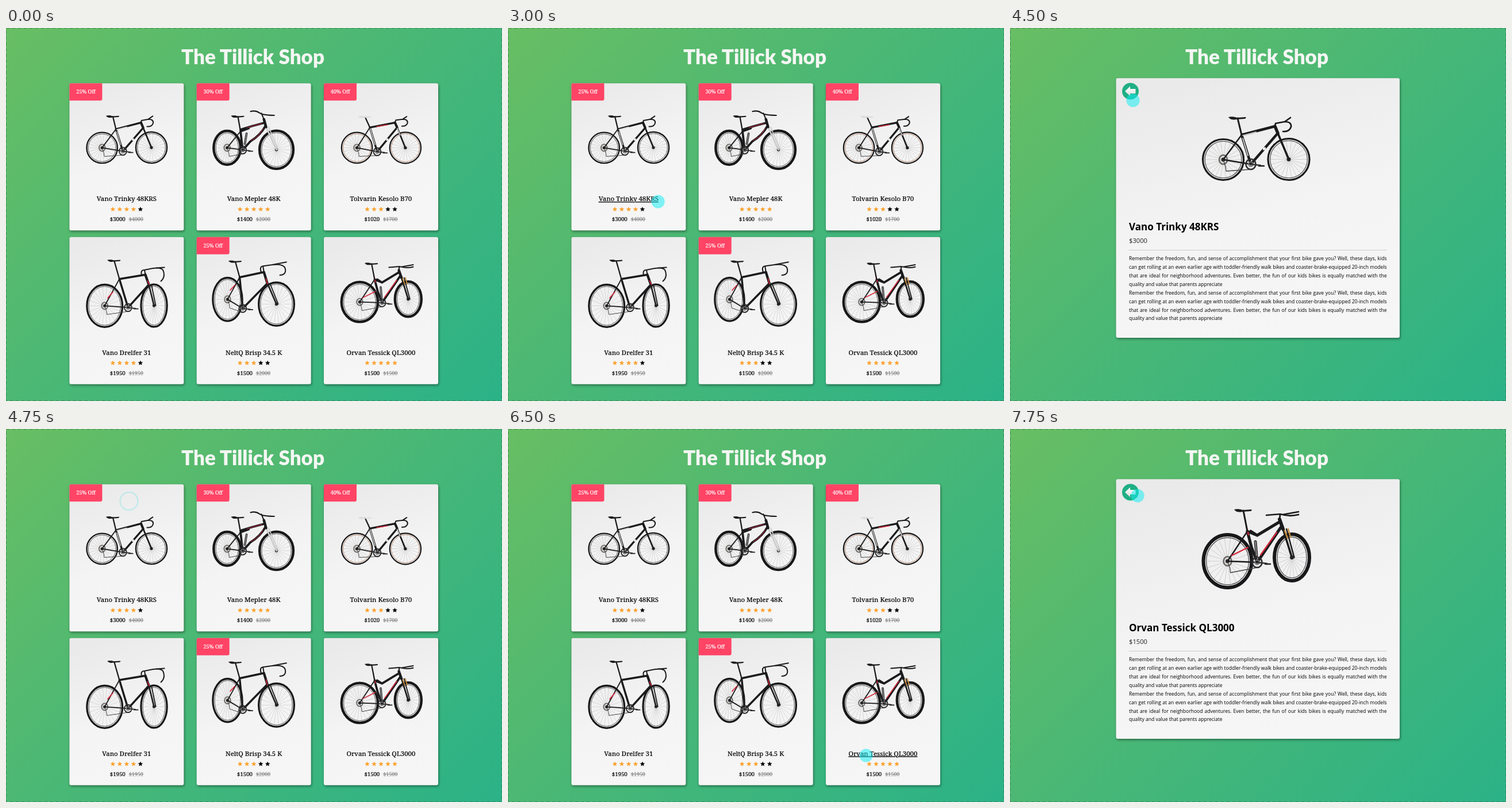
Write an HTML page that moves like this. It is 863 px wide and 649 px high and loops after 8 s.

```html
<!DOCTYPE html>
<html lang="en">
<head>
<meta charset="utf-8">
<title>Bike shop</title>
<style>
  html, body { margin: 0; width: 100%; height: 100%; overflow: hidden; }
  body { background: linear-gradient(135deg, #68be63, #4cb874 43%, #2bb287); }
  svg { display: block; width: 863px; height: 649px; }
  path { fill: none; stroke-linecap: round; stroke-linejoin: round; }
  text { text-anchor: middle; }
  .shop { font: 900 35px Lato, sans-serif; fill: #f4f6f3; }
  .name, .price, .off { font-family: "Noto Serif", serif; font-weight: 500; }
  .name { font-size: 11.4px; stroke: #000; stroke-width: .2; }
  .price { font-size: 9.6px; stroke: #000; stroke-width: .2; }
  .old { font-size: 9px; fill: #777; stroke: none; text-decoration: line-through; }
  .off { font-size: 9px; fill: #fff; stroke: #fff; stroke-width: .2; }
  .card { filter: drop-shadow(1px 2px 2px rgba(0, 0, 0, .42)); }
  .title, .cost { font-family: "Open Sans", sans-serif; text-anchor: start; }
  .title { font-size: 17.05px; font-weight: 700; }
  .cost { font-size: 11.2px; fill: #222; }
  p { margin: 0; font: 8.53px/14.87px "Open Sans", sans-serif; text-align: justify; color: #000; }
</style>
</head>
<body>
<svg id="stage" viewBox="0 0 863 649"></svg>
<script>
const LOOP = 8000;
const blurb = 'Remember the freedom, fun, and sense of accomplishment that your first bike gave you? ' +
  'Well, these days, kids can get rolling at an even earlier age with toddler-friendly walk bikes and ' +
  'coaster-brake-equipped 20-inch models that are ideal for neighborhood adventures. Even better, the fun ' +
  'of our kids bikes is equally matched with the quality and value that parents appreciate';

// Geometry is given at the size of the detail page.
const bikes = [
  { name: 'Vano Trinky 48KRS', price: 3000, old: 4000, stars: 4, off: 25,
    rear: [371, 229, 35.5, 35.5], front: [485, 228.5, 36, 36], tyre: 3.2,
    bb: [419, 237], seat: [396, 157], top: [403, 186], head: [461, 171], crown: [466, 183],
    tube: 4.4, bar: 'M461 171L462 166 478 163q12 0 11 9q-3 9-14 8M478 163L488 156',
    trim: 'M405 187L428 181M405 192L414 222', trimColor: '#ddd', mark: '#eee' },
  { name: 'Vano Mepler 48K', price: 1400, old: 2000, stars: 5, off: 30,
    rear: [366, 229, 31, 39], front: [480, 233.5, 39, 44], tyre: 6,
    bb: [402, 234], seat: [391, 157], top: [397, 191], head: [451, 163], crown: [456, 181],
    tube: 5, bar: 'M420 145Q432 142 440 148T475 154M445 149L451 163', fork: '#ccc',
    frame: 'M397 187Q425 178 453 171M455 178Q443 200 420 214L402 234 397 191L416 184',
    trim: 'M412 183Q432 176 446 173M449 185Q440 203 422 212', trimColor: '#8e2638', shock: 'M411 196L407 220' },
  { name: 'Tolvarin Kesolo B70', price: 1020, old: 1700, stars: 3, off: 40,
    rear: [372, 229, 35.5, 35.5], front: [484, 229, 36, 36], tyre: 3, rim: '#b98a72',
    bb: [419, 238], seat: [391, 158], top: [402, 182], head: [460, 171], crown: [465, 182],
    tube: 4.4, bar: 'M460 171L462 165 478 163q12 0 11 9q-3 8-13 7M478 163L487 157', saddle: '#ddd',
    trim: 'M403 185L414 222M465 184L472 200', trimColor: '#eee', red: 'M418 180L442 176', mark: '#eee' },
  { name: 'Vano Drelfer 31', price: 1950, old: 1950, stars: 4,
    rear: [377, 239, 41, 49], front: [491, 238.5, 30, 49], tyre: 4.4,
    bb: [431, 243], seat: [399, 135], top: [411, 177], head: [471, 167], crown: [479, 190],
    tube: 4.6, bar: 'M471 167L469 156Q460 156 462 166M469 156L490 152Q508 150 512 157Q518 172 507 182M490 152L515 150',
    red: 'M476 181L480 190M384 221L396 207', fork: '#222' },
  { name: 'NeltQ Brisp 34.5 K', price: 1500, old: 2000, stars: 3, off: 25,
    rear: [367, 224, 34, 50], front: [480, 235, 41, 50], tyre: 4.4,
    bb: [402, 245], seat: [385, 137], top: [395, 173], head: [451, 161], crown: [459, 187],
    tube: 4.6, bar: 'M451 161L449 147Q440 148 445 162M449 147L470 144Q496 141 500 152Q504 167 488 168M470 144L503 138',
    red: 'M456 176L459 188M373 203L384 191', fork: '#222' },
  { name: 'Orvan Tessick QL3000', price: 1500, old: 1500, stars: 5,
    rear: [378.5, 230, 42, 46], front: [490.5, 223.5, 30.5, 40.5], tyre: 6,
    bb: [430, 232], seat: [406, 142], top: [413, 178], head: [469, 157], crown: [475, 174],
    tube: 5, bar: 'M446 150L470 148Q486 153 502 149M474 149L502 144M469 157L470 149', fork: '#1e1e1e', gold: 'M476 172L483 190M484 174L488 188',
    frame: 'M413 178L430 185 470 161M413 178L420 205 430 232 472 170M430 185L419 178',
    red: 'M436 219L464 180M386 220L414 206M411 169L415 184', shock: 'M427 196L429 220' }
];

const stroke = (d, width, color = '#1b1b1d') => d ? `<path d="${d}" stroke="${color}" stroke-width="${width}"/>` : '';
const poly = (...pts) => 'M' + pts.map(([x, y]) => x + ' ' + y).join('L');
const ring = ([x, y, rx, ry], width, color) =>
  `<ellipse cx="${x}" cy="${y}" rx="${rx}" ry="${ry}" fill="none" stroke="${color}" stroke-width="${width}"/>`;

function wheel([x, y, rx, ry], tyre, rim = '#555') {
  let d = '';
  for (let i = 0; i < 22; i++) {
    const a = i * Math.PI / 11;
    d += poly([x, y], [x + Math.cos(a) * (rx - tyre), y + Math.sin(a) * (ry - tyre)]);
  }
  const inner = tyre * .5 + 2;
  return stroke(d, .5, '#aaa') + ring([x, y, rx, ry], tyre, '#18181a') +
    ring([x, y, rx - inner, ry - inner], 1.3, rim) +
    `<circle cx="${x}" cy="${y}" r="3.5" fill="#29292b"/>`;
}

function drawBike(b) {
  const [sx, sy] = b.seat, [bx, by] = b.bb, [rx, ry] = b.rear;
  const mid = [(b.crown[0] + bx) / 2, (b.crown[1] + by) / 2];
  const mark = b.mark
    ? `<rect x="${mid[0] - 2.5}" y="${mid[1] - 2.5}" width="5" height="5" fill="${b.mark}"/>` : '';
  return wheel(b.rear, b.tyre, b.rim) + wheel(b.front, b.tyre, b.rim) +
    ring([rx, ry, 7, 8], 2.5, '#6c6864') +
    stroke(poly([rx, ry], [rx + 4, ry + 12], [rx + 5, ry + 20], [bx, by + 9]), 1.3, '#444') +
    stroke(poly(b.bb, b.rear, b.top), 2.4) +
    stroke(poly(b.crown, b.front), 3.6, b.fork) +
    stroke(b.fork && poly([b.crown[0] + 6, b.crown[1]], [b.front[0] + 4, b.front[1]]), 2.5, b.fork) +
    stroke(b.gold, 2.4, '#c58a3c') +
    stroke(b.frame || poly(b.top, b.head, b.crown, b.bb, b.top), b.tube) +
    stroke(poly(b.head, b.crown), b.tube + 1) +
    stroke(b.trim, 1.8, b.trimColor) + stroke(b.red, 2.2, '#d8263a') +
    stroke(b.shock, 5, '#3a3a3c') + stroke(b.shock, 1.5, '#999') + mark +
    stroke(poly(b.seat, b.top), 3) +
    `<path d="M${sx - 16} ${sy - 2}q8-2 15 1l15-1q2 2-2 3l-14 1q-10 2-14-4" style="fill:${b.saddle || '#1b1b1d'}"/>` +
    stroke(b.bar, 2.7) +
    ring([bx, by, 8.5, 9], 2.6, '#2c2c2e') + ring([bx, by, 4, 4], 2, '#777') +
    stroke(poly(b.bb, [bx + 17, by + 2]), 2.6, '#333') + stroke(`M${bx + 14} ${by + 3}h9`, 2.4, '#222');
}

function star(x, y, color) {
  const pts = Array.from({ length: 10 }, (_, i) => {
    const a = (i / 5 - .5) * Math.PI, r = i % 2 ? 2.1 : 4.5;
    return (x + r * Math.cos(a)).toFixed(2) + ',' + (y + r * Math.sin(a)).toFixed(2);
  });
  return `<polygon points="${pts.join(' ')}" fill="${color}"/>`;
}

function drawCard(b, i) {
  const x = 110.4 + i % 3 * 221.3, y = i < 3 ? 96.2 : 363.7;
  const badge = b.off
    ? `<path d="M0 30V3Q0 0 3 0H57V27Q57 30 54 30Z" style="fill:#ff4465"/>
       <text class="off" x="28.5" y="18">${b.off}% Off</text>` : '';
  const stars = [0, 1, 2, 3, 4].map(k => star(75.5 + k * 12, 219.2, k < b.stars ? '#fba433' : '#000')).join('');
  return `<g transform="translate(${x} ${y})">
    <rect class="card" width="199" height="256" rx="3" fill="url(#paper)"/>${badge}
    <g transform="scale(.753) translate(-295.6 -80)">${drawBike(b)}</g>
    <text class="name" id="name${i}" x="99.4" y="205">${b.name}</text>${stars}
    <text class="price" x="99.4" y="240">$${b.price}<tspan class="old" dx="6">$${b.old}</tspan></text></g>`;
}

const drawDetail = (b, id) => `<g id="${id}">
  <rect class="card" x="184.5" y="87.3" width="493.5" height="451.7" rx="3" fill="url(#paper)"/>
  <circle cx="209.5" cy="110" r="14.5" fill="#20af85"/>
  <path d="M200 110L209 101.5V106H218.5V114H209V118.5Z" style="fill:url(#arrow)"/>
  ${drawBike(b)}
  <text class="title" x="207" y="351.5">${b.name}</text>
  <text class="cost" x="207" y="374">$${b.price}</text>
  <path d="M207 386.5H655.5" stroke="#ccc"/>
  <foreignObject x="207" y="394.3" width="448.5" height="130"><p>${blurb}</p><p>${blurb}</p></foreignObject></g>`;

const $ = id => document.getElementById(id);
$('stage').innerHTML = `
  <defs>
    <linearGradient id="paper" x1=".3" y1="0" x2=".6" y2="1">
      <stop stop-color="#eaeaea"/><stop offset=".55" stop-color="#f4f4f4"/><stop offset="1" stop-color="#f6f6f6"/>
    </linearGradient>
    <linearGradient id="arrow" x2="0" y2="1"><stop stop-color="#fff"/><stop offset="1" stop-color="#dcdcdc"/></linearGradient>
  </defs>
  <rect x=".5" y=".5" width="862" height="648" fill="none" stroke="#355f43" stroke-opacity=".55" stroke-dasharray="6 4"/>
  <text class="shop" x="429.5" y="62.5">The Tillick Shop</text>
  <g id="list">${bikes.map(drawCard).join('')}</g>
  ${drawDetail(bikes[0], 'first')}${drawDetail(bikes[5], 'last')}
  <circle id="dot" r="11.6" fill="#10eef4" fill-opacity=".52"/>
  <circle id="ripple" r="15.5" fill="none" stroke="#52e0e6" stroke-opacity=".32" stroke-width="2"/>`;

// Each step holds until the next one: [ms, value].
function play(el, steps, toStyle) {
  const frames = steps.map(([ms, ...v]) => ({ offset: ms / LOOP, easing: 'step-end', ...toStyle(...v) }));
  frames.push({ ...frames[frames.length - 1], offset: 1 });
  el.animate(frames, { duration: LOOP, iterations: Infinity }).startTime = 0;
}
const show = on => ({ visibility: on ? 'visible' : 'hidden' });
const place = (x, y) => x === undefined
  ? { opacity: 0, transform: 'translate(0px, 0px)' }
  : { opacity: 1, transform: `translate(${x}px, ${y}px)` };
const underline = on => ({ textDecorationLine: on ? 'underline' : 'none' });

play($('list'), [[0, 1], [3250, 0], [4750, 1], [6750, 0]], show);
play($('first'), [[0, 0], [3250, 1], [4750, 0]], show);
play($('last'), [[0, 0], [6750, 1]], show);
play($('name0'), [[0, 0], [2750, 1], [3250, 0]], underline);
play($('name5'), [[0, 0], [6000, 1], [6750, 0]], underline);
play($('dot'), [
  [0], [250, 706, 22], [500, 706, 36], [750, 706, 48], [1000],
  [2000, 387, 242], [2250, 322, 268], [2500, 279, 291], [2750, 263, 300], [3000, 261, 302], [3250],
  [4000, 246, 205], [4250, 222, 148], [4500, 214, 126], [4750],
  [5250, 330, 255], [5500, 465, 400], [5750, 578, 512], [6000, 623, 556], [6250, 623, 566], [6500, 623, 568], [6750],
  [7250, 330, 232], [7500, 252, 141], [7750, 222, 116]
], place);
play($('ripple'), [
  [0], [1000, 706, 48], [1250], [3250, 261, 302], [3500], [4750, 214, 125.5], [5000], [6750, 623, 568], [7000]
], place);
</script>
</body>
</html>
```
